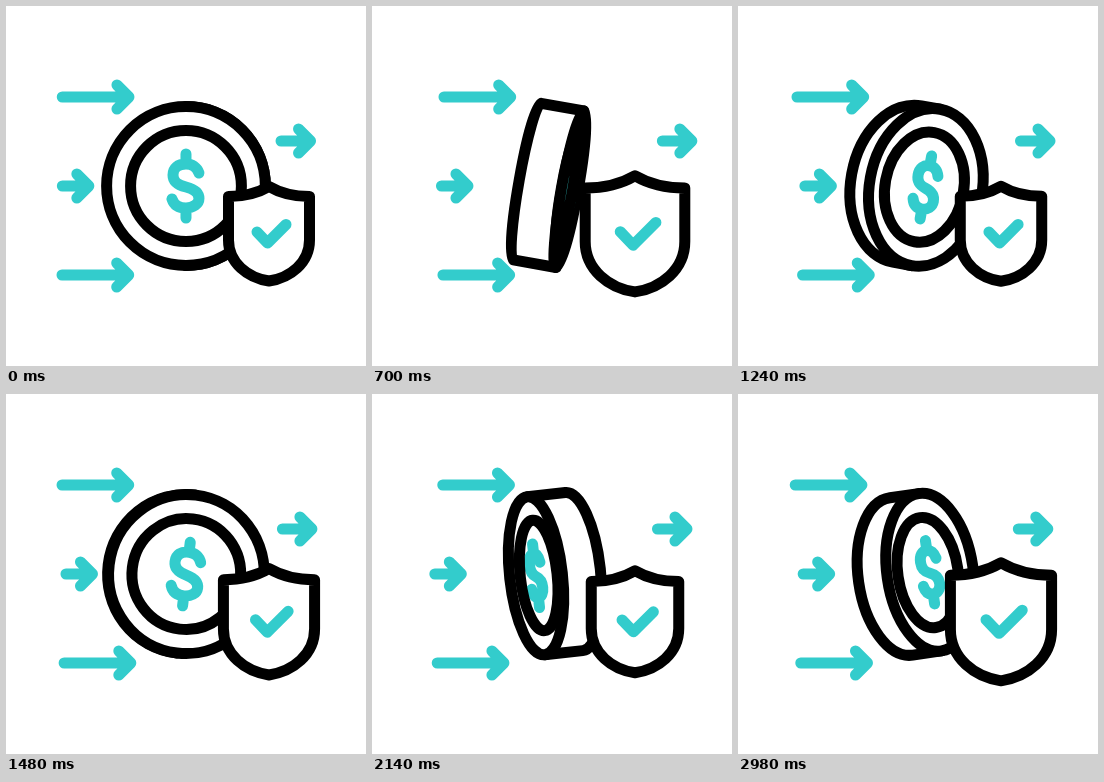
These frames come from a looping animation (360 by 360 pixels, 3000 ms). An HTML page:

```html
<!DOCTYPE html>
<html lang="en">
<head>
<meta charset="utf-8">
<title>Protected payment</title>
<style>
  html, body { margin: 0; width: 100%; height: 100%; overflow: hidden; background: #fff; }
  svg { display: block; width: 100%; height: 100%; }
  path, ellipse { fill: none; stroke: #000; stroke-width: 11; stroke-linecap: round; stroke-linejoin: round; vector-effect: non-scaling-stroke; }
  .teal { stroke: #33cccc; }
  .solid { fill: #fff; }
</style>
</head>
<body>
<svg viewBox="0 0 360 360">
  <g id="arrows"></g>
  <g id="coin">
    <path id="side" class="solid"/>
    <ellipse id="face" class="solid" ry="79.5"/>
    <path id="dollar" class="teal" d="M13-13C11-19 6-22 0-22C-8-22-13-18-13-11C-13-4-8-1 0 1C8 3 13 7 13 12.5C13 18 7 22 0 22C-7 22-12 19-14 13M0-32V-22M0 22V32"/>
    <ellipse id="ring" ry="55.5"/>
  </g>
  <g id="shield">
    <path class="solid" d="M263 180.5Q246 190.5 222.5 190.5V234C222.500 257 242 272 263 275C284 272 303.500 257 303.500 234V190.5Q280 190.5 263 180.5Z"/>
    <path class="teal" d="M251 226L261.500 237L280 218.500"/>
  </g>
</svg>
<script>
const LOOP = 3000;
const RADIUS = 79.5;
const THICKNESS = 44;
const $ = id => document.getElementById(id);
const set = (el, attrs) => Object.entries(attrs).forEach(([k, v]) => el.setAttribute(k, v));
const sine = p => (1 - Math.cos(Math.PI * p)) / 2;
const linear = p => p;

// Interpolates [time, value] keys.
function keyed(t, keys, ease) {
  let i = 1;
  while (i < keys.length - 1 && t > keys[i][0]) i++;
  const [t0, a] = keys[i - 1], [t1, b] = keys[i];
  return a + (b - a) * ease((t - t0) / (t1 - t0));
}

const swing = (start, half) => t => sine((t - start) / half);

const topKeys = [[-60, 0], [690, 1], [1460, 0], [2290, 1], [3130, 0]];
const tiltKeys = [[0, 0], [950, 12], [2650, -11], [3650, 0]];
// Odd values are front views, even values are edge-on views.
const turnKeys = [[0, 1], [610, 2], [1500, 3], [2460, 4], [3420, 5]];

const arrows = [
  { tail: 56, tip: 122.7, y: 91, move: t => keyed(t, topKeys, sine) },
  { tail: 56, tip: 82.5, y: 180, move: swing(80, 840) },
  { tail: 56, tip: 122.7, y: 269, move: swing(0, 840) },
  { tail: 275, tip: 304.5, y: 135, move: swing(-25, 833) }
].map(({ tail, tip, y, move }) => {
  const el = document.createElementNS('http://www.w3.org/2000/svg', 'path');
  set(el, { class: 'teal', d: `M${tail} ${y}H${tip}M${tip - 12} ${y - 12}L${tip} ${y}L${tip - 12} ${y + 12}` });
  $('arrows').append(el);
  return { el, move };
});

function drawCoin(t) {
  const turn = keyed(t, turnKeys, linear);
  const width = Math.max(0.01, Math.abs(turn % 2 - (turn % 2 > 1 ? 2 : 0)));
  const frontWidth = Math.floor(turn) % 2 ? 2 - turn % 2 : turn % 2;
  const w = Math.max(0.01, Math.min(width, frontWidth));
  const toRight = Math.floor(turn) % 2 === 0;
  const side = toRight ? 1 : -1;
  const slant = Math.sqrt(1 - w * w);
  const depth = side * THICKNESS * slant ** 2.4;
  const face = depth * 0.42;
  const back = face - depth;
  const inner = face - side * 3 * slant ** 2;
  const rx = RADIUS * w;

  set($('coin'), { transform: `translate(180 180) rotate(${keyed(t, tiltKeys, sine)})` });
  set($('side'), {
    d: `M${back} ${-RADIUS}A${rx} ${RADIUS} 0 0 ${toRight ? 0 : 1} ${back} ${RADIUS}H${face}V${-RADIUS}Z`
  });
  set($('face'), { cx: face, rx });
  set($('ring'), { cx: inner, rx: 55.5 * w });
  set($('dollar'), { transform: `translate(${face}) scale(${w ** 0.8} 1)` });
}

function draw(t) {
  for (const { el, move } of arrows) set(el, { transform: `translate(${16 * move(t)})` });
  drawCoin(t);
  const scale = 1 + 0.25 * swing(0, 592)(t);
  set($('shield'), { transform: `translate(263 227.5) scale(${scale}) translate(-263 -227.5)` });
}

const start = performance.now();
function tick() {
  draw((performance.now() - start) % LOOP);
  requestAnimationFrame(tick);
}
tick();
</script>
</body>
</html>
```
